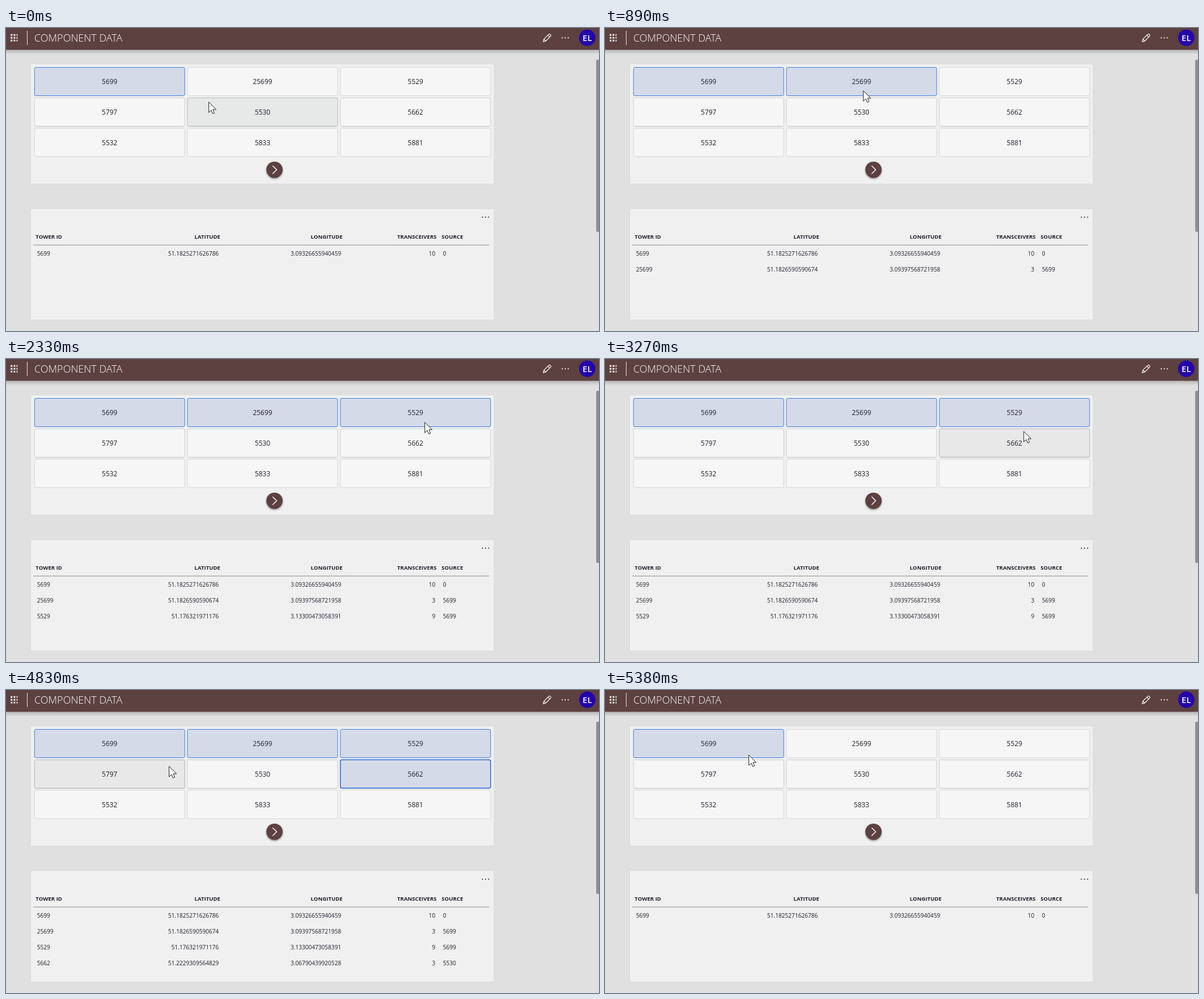
These frames come from a looping animation (1046 px wide and 535 px high, 5910 ms). An HTML page:

```html
<!DOCTYPE html>
<html lang="en">
<head>
<meta charset="utf-8">
<title>Component data</title>
<style>
  :root {
    --plain: #f6f6f6;  --edge: #d6d6d6;
    --hover: #e8e8e8;  --hover-edge: #b3b5b4;
    --pick: #d5dae8;   --pick-edge: #3b7fe0;
    --brown: #5d4040;
    --loop: 5910ms;
  }
  html, body { margin: 0; width: 100%; height: 100%; overflow: hidden; background: #e0e0e0; }
  svg { display: block; width: 1046px; height: 535px; }
  text { font-family: "Open Sans", "Noto Sans", sans-serif; fill: #201f2e; }

  .title { font-size: 18px; font-weight: 300; fill: #fff; }
  .user { font-size: 15px; font-weight: 600; fill: #fff; text-anchor: middle; }
  .panel { fill: #f0f0f0; stroke: #dadada; }
  .tile rect { width: 265px; height: 50px; rx: 2.5px; fill: var(--plain); stroke: var(--edge); }
  .tile text { font-size: 11.9px; text-anchor: middle; }
  .mid rect { stroke: #cfcfcf; }
  .tile .picked { fill: var(--pick); stroke: var(--pick-edge); }
  .head text { font-size: 9.6px; font-weight: 700; }
  .row text { font-size: 10.1px; }
  .end { text-anchor: end; }

  .t25699, .t5529, .t5530, .t5662, .t5797 { animation: var(--loop) step-end infinite; }
  .t25699 { animation-name: t25699; }
  .t5529 { animation-name: t5529; }
  .t5530 { animation-name: t5530; }
  .t5662 { animation-name: t5662; }
  .t5797 { animation-name: t5797; }
  .r2, .r3, .r4 { animation: r2 var(--loop) step-end infinite; }
  .r3 { animation-name: r3; }
  .r4 { animation-name: r4; }
  .pointer { animation: pointer var(--loop) linear infinite; }

  @keyframes t25699 {
    0%, 89.84% { fill: var(--plain); stroke: var(--edge); }
    4.73% { fill: var(--hover); stroke: var(--hover-edge); }
    12.85% { fill: var(--pick); stroke: var(--pick-edge); }
  }
  @keyframes t5529 {
    0%, 89.84% { fill: var(--plain); stroke: var(--edge); }
    31.46% { fill: var(--hover); stroke: var(--hover-edge); }
    38.23% { fill: var(--pick); stroke: var(--pick-edge); }
  }
  @keyframes t5530 {
    0% { fill: #e6e9e8; stroke: #b5bbb8; }
    21.99%, 79.35% { fill: var(--hover); stroke: var(--hover-edge); }
    4.73%, 25.54%, 81.71% { fill: var(--plain); stroke: #cfcfcf; }
  }
  @keyframes t5662 {
    0%, 30.28%, 89.84% { fill: var(--plain); stroke: #cfcfcf; stroke-width: 1px; }
    25.54%, 55.32% { fill: var(--hover); stroke: var(--hover-edge); stroke-width: 1px; }
    65.47% { fill: var(--pick); stroke: #2a6be0; stroke-width: 1.5px; }
  }
  @keyframes t5797 {
    0%, 85.27% { fill: var(--plain); stroke: #cfcfcf; }
    81.71% { fill: var(--hover); stroke: var(--hover-edge); }
  }
  @keyframes r2 { 0%, 91.02% { opacity: 0; } 15.05% { opacity: 1; } }
  @keyframes r3 { 0%, 91.02% { opacity: 0; } 39.42% { opacity: 1; } }
  @keyframes r4 { 0%, 91.02% { opacity: 0; } 67.85% { opacity: 1; } }

  /* the pointer advances about every 70 ms */
  @keyframes pointer {
    0% { transform: translate(357px, 130px); }
    1.18% { transform: translate(357px, 130px); animation-timing-function: steps(4, start); }
    5.92% { transform: translate(425px, 118px); animation-timing-function: steps(4, start); }
    10.65%, 19.62% { transform: translate(455px, 110px); animation-timing-function: steps(4, start); }
    24.36% { transform: translate(560px, 132px); animation-timing-function: steps(5, start); }
    30.28% { transform: translate(690px, 135px); animation-timing-function: steps(1, start); }
    31.46% { transform: translate(711px, 121px); animation-timing-function: steps(4, start); }
    36.2% { transform: translate(738px, 111px); }
    55.32% { transform: translate(738px, 111px); animation-timing-function: steps(1, start); }
    56.51% { transform: translate(738px, 127px); animation-timing-function: steps(7, start); }
    64.8% { transform: translate(728px, 164px); }
    75.62% { transform: translate(728px, 164px); animation-timing-function: steps(2, start); }
    78.17% { transform: translate(604px, 154px); animation-timing-function: steps(4, start); }
    82.9% { transform: translate(287px, 134px); animation-timing-function: steps(3, start); }
    86.45% { transform: translate(258px, 119px); animation-timing-function: steps(1, start); }
    87.64%, 100% { transform: translate(253px, 114px); }
  }
</style>
</head>
<body>
<svg viewBox="0 0 1046 535">
  <defs>
    <linearGradient id="shade" x2="0" y2="1">
      <stop stop-color="#000" stop-opacity=".2"/>
      <stop offset="1" stop-color="#000" stop-opacity="0"/>
    </linearGradient>
    <filter id="lift" x="-30%" y="-30%" width="160%" height="170%">
      <feDropShadow dx="0" dy="1.5" stdDeviation="1.5" flood-opacity=".45"/>
    </filter>
  </defs>

  <rect width="1046" height="535" fill="#e0e0e0"/>
  <rect y="38" width="1046" height="9" fill="url(#shade)"/>
  <rect width="1046" height="38.5" fill="var(--brown)"/>
  <path d="M9.7 12.2h12M9.7 17.2h12M9.7 22.2h12" stroke="#fff" stroke-width="2.9" stroke-dasharray="2.9 2.3" transform="translate(-1.4 0)" fill="none"/>
  <path d="M37.5 5v25" stroke="#eee4e4"/>
  <text class="title" x="50" y="24">COMPONENT DATA</text>
  <g fill="none" stroke="#fff" stroke-width="1.2" stroke-linejoin="round">
    <path d="M947.7 24.3l1.1-4.6 8.6-8.6q1.5-1.2 3 .3t.3 3l-8.6 8.6zM955.8 12.7l3.4 3.4M948.8 19.7l3.3 3.3"/>
  </g>
  <g fill="#fff">
    <circle cx="981.3" cy="17.3" r="1.1"/><circle cx="986.5" cy="17.3" r="1.1"/><circle cx="991.7" cy="17.3" r="1.1"/>
  </g>
  <circle cx="1025.3" cy="17.2" r="14.4" fill="#2304ac"/>
  <text class="user" x="1025.3" y="22.6">EL</text>
  <rect x="1041" y="56" width="6" height="304" rx="2.5" fill="#8f8f8f"/>

  <rect class="panel" x="43.5" y="63.5" width="817.5" height="212"/>
  <path d="M52 174h262M322 174h261M592 174h261" stroke="#cbcbcb"/>
  <g class="tile">
    <rect class="picked" x="50.3" y="69.5"/><text x="182.7" y="98.9">5699</text>
    <rect class="t25699" x="320" y="69.5"/><text x="452.5" y="98.9">25699</text>
    <rect class="t5529" x="589.8" y="69.5"/><text x="722.2" y="98.9">5529</text>
  </g>
  <g class="tile mid">
    <rect class="t5797" x="50.3" y="123.3"/><text x="182.7" y="153">5797</text>
    <rect class="t5530" x="320" y="123.3"/><text x="452.5" y="153">5530</text>
    <rect class="t5662" x="589.8" y="123.3"/><text x="722.2" y="153">5662</text>
  </g>
  <g class="tile">
    <rect x="50.3" y="177"/><text x="182.7" y="206.7">5532</text>
    <rect x="320" y="177"/><text x="452.5" y="206.7">5833</text>
    <rect x="589.8" y="177"/><text x="722.2" y="206.7">5881</text>
  </g>
  <circle cx="473.6" cy="250.3" r="14.4" fill="var(--brown)" filter="url(#lift)"/>
  <path d="M470.3 243.2l7.2 7.1-7.2 7.1" fill="none" stroke="#fff" stroke-width="1.4"/>

  <rect class="panel" x="43.5" y="319" width="817.5" height="196.5"/>
  <g fill="#252430">
    <circle cx="840.3" cy="334" r="1"/><circle cx="845.8" cy="334" r="1"/><circle cx="851.3" cy="334" r="1"/>
  </g>
  <g class="head">
    <text x="52.3" y="372.4">TOWER ID</text>
    <text class="end" x="378" y="372.4">LATITUDE</text>
    <text class="end" x="593.7" y="372.4">LONGITUDE</text>
    <text class="end" x="759.5" y="372.4">TRANSCEIVERS</text>
    <text x="768.3" y="372.4">SOURCE</text>
  </g>
  <path d="M48 383.2h804" stroke="#a8aea9" stroke-width="1.5"/>
  <g class="row">
    <text x="54.7" y="401.5">5699</text>
    <text class="end" x="375.3" y="401.5">51.1825271626786</text>
    <text class="end" x="591.2" y="401.5">3.09326655940459</text>
    <text class="end" x="757.3" y="401.5">10</text>
    <text x="770.8" y="401.5">0</text>
  </g>
  <g class="row r2">
    <text x="54.7" y="429.7">25699</text>
    <text class="end" x="375.3" y="429.7">51.1826590590674</text>
    <text class="end" x="591.2" y="429.7">3.09397568721958</text>
    <text class="end" x="757.3" y="429.7">3</text>
    <text x="770.8" y="429.7">5699</text>
  </g>
  <g class="row r3">
    <text x="54.7" y="457.9">5529</text>
    <text class="end" x="375.3" y="457.9">51.176321971176</text>
    <text class="end" x="591.2" y="457.9">3.13300473058391</text>
    <text class="end" x="757.3" y="457.9">9</text>
    <text x="770.8" y="457.9">5699</text>
  </g>
  <g class="row r4">
    <text x="54.7" y="486.1">5662</text>
    <text class="end" x="375.3" y="486.1">51.2229309564829</text>
    <text class="end" x="591.2" y="486.1">3.06790439920528</text>
    <text class="end" x="757.3" y="486.1">3</text>
    <text x="770.8" y="486.1">5530</text>
  </g>

  <g class="pointer">
    <path d="M.7.8v18.3l4.3-4 2.7 6.2 3-1.3-2.6-6.1h5.6z" fill="#fff" stroke="#1c1c1c"/>
  </g>
</svg>
</body>
</html>
```
